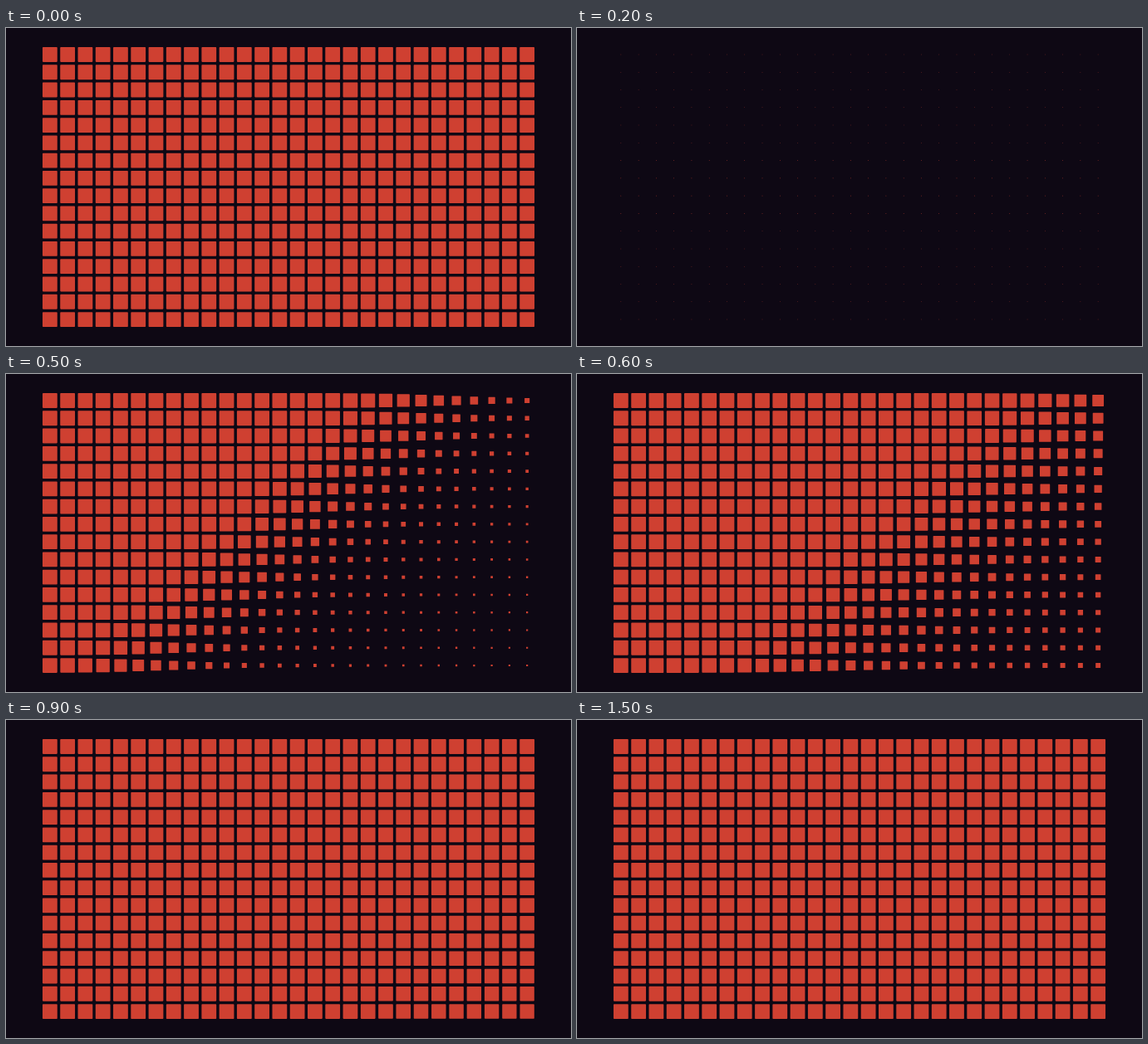
An HTML page with a canvas that plays this animation: 680x383 px, repeating every 1.6 s.

```html
<!DOCTYPE html>
<html lang="en">
<head>
<meta charset="utf-8">
<title>Tile wave</title>
<style>
  html, body { margin: 0; width: 100%; height: 100%; overflow: hidden; background: #0e0814; }
  canvas { display: block; }
</style>
</head>
<body>
<canvas id="stage" width="680" height="383"></canvas>
<script>
const ctx = document.getElementById('stage').getContext('2d');
const COLS = 28, ROWS = 16, PITCH = 21.27, SIZE = 17.8;
const LOOP = 1600, STEP = 100, SHRINK = 250;

const clamp = v => Math.min(1, Math.max(0, v));
const sineInOut = v => (1 - Math.cos(Math.PI * v)) / 2;
const cubicInOut = v => v < 0.5 ? 4 * v ** 3 : 1 - 4 * (1 - v) ** 3;

// All tiles shrink together, then grow back more slowly away from the top left.
function tileScale(col, row, t) {
  if (t < SHRINK) return 1 - cubicInOut(t / SHRINK);
  const distance = (col + row * 16 / 15) / 43;
  const duration = 31 + 770 * sineInOut(distance);
  return cubicInOut(clamp((t - SHRINK) / duration));
}

function draw(t) {
  ctx.fillStyle = '#0e0814';
  ctx.fillRect(0, 0, 680, 383);
  ctx.fillStyle = '#cf4031';
  ctx.beginPath();
  for (let row = 0; row < ROWS; row++) {
    for (let col = 0; col < COLS; col++) {
      const scale = tileScale(col, row, t), size = SIZE * scale;
      const x = 340 + (col - (COLS - 1) / 2) * PITCH - size / 2;
      const y = 191.5 + (row - (ROWS - 1) / 2) * PITCH - size / 2;
      ctx.roundRect(x, y, size, size, 0.8 * scale);
    }
  }
  ctx.fill();
}

// The motion runs at ten poses a second; the offset absorbs display-frame jitter.
function frame() {
  const t = (performance.now() + 8) % LOOP;
  draw(Math.floor(t / STEP) * STEP);
  requestAnimationFrame(frame);
}
frame();
</script>
</body>
</html>
```
